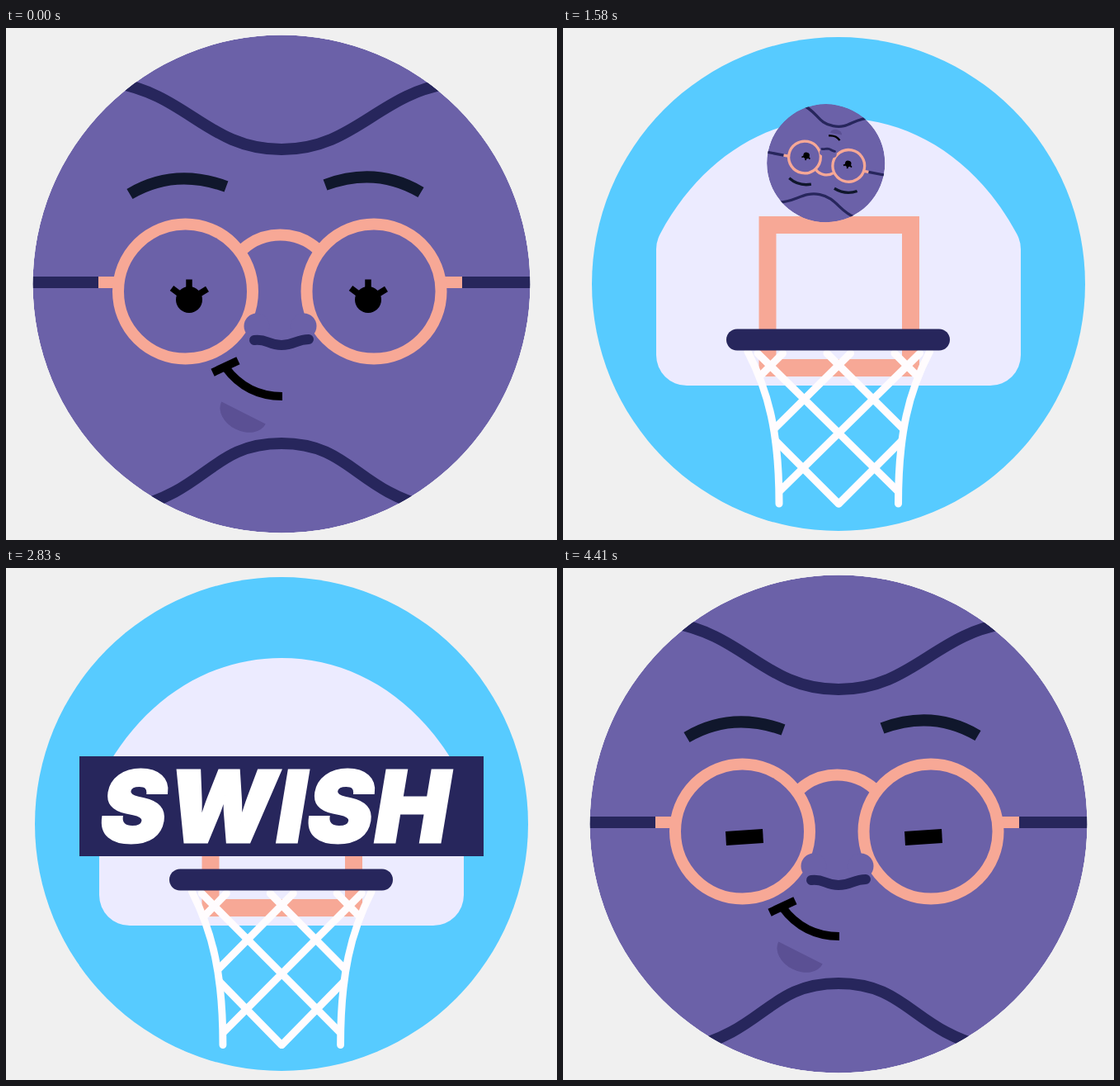
Recreate the animation shown at these times as an HTML page. Size 668 by 620 pixels, loop 4.5 s.

```html
<!DOCTYPE html>
<html lang="en">
<head>
<meta charset="utf-8">
<title>Swish</title>
<style>
  html, body { margin: 0; width: 100%; height: 100%; overflow: hidden; background: #f0f0f0; }
  svg { display: block; width: 668px; height: 620px; }
  .line { fill: none; stroke: #27265c; stroke-width: 14; }
  .frame { fill: none; stroke: #f7a896; stroke-width: 14; }
  .skin { fill: #6b61a8; }
  .navy { fill: #27265c; }
  .net { fill: none; stroke: #fffcfe; stroke-width: 9; stroke-linecap: round; stroke-linejoin: round; }
  .label {
    font: italic 900 120px Inter, "Liberation Sans", sans-serif; letter-spacing: 2px;
    fill: #fff; stroke: #fff; stroke-width: 3; stroke-miterlimit: 2; text-anchor: middle;
  }
</style>
</head>
<body>
<svg viewBox="0 0 668 620">
  <defs>
    <clipPath id="sky"><circle cx="334" cy="310" r="299"/></clipPath>
    <clipPath id="head"><circle cx="334" cy="310" r="301.5"/></clipPath>
    <clipPath id="wipe"><rect id="wipeRect" y="228" height="121"/></clipPath>
    <g id="eye">
      <circle cx="222" cy="329" r="16"/>
      <path d="M222 320V304.5M213 324L201 315M231 324L244 316" stroke="#000" stroke-width="7.5"/>
    </g>
    <path id="lid" d="M197 319L242 316L243 333L198 336Z"/>
    <g id="netHalf">
      <path d="M224 392C249 440 262 490 262 576"/>
      <path d="M236 394L405 560M320 394L412 485M258 500L334 576M402 394L428 420"/>
    </g>
  </defs>

  <circle cx="334" cy="310" r="299" fill="#57cbff"/>
  <path fill="#ecebff" d="M113 396V268Q113 258 118 249C167 158 247 109 334 109S501 158 550 249Q555 258 555 268V396A37 37 0 0 1 518 433H150A37 37 0 0 1 113 396Z"/>
  <rect x="248" y="238.500" width="173.500" height="173" fill="none" stroke="#f7a896" stroke-width="21"/>

  <g clip-path="url(#sky)"><use id="ball" href="#face"/></g>

  <g id="net" class="net">
    <use href="#netHalf"/>
    <use href="#netHalf" transform="matrix(-1 0 0 1 668.500 0)"/>
  </g>
  <rect class="navy" x="198" y="364.500" width="271" height="26" rx="13"/>

  <g clip-path="url(#wipe)">
    <rect class="navy" x="50" y="228" width="580" height="121"/>
    <text id="label" class="label" x="327" y="332">SWISH</text>
  </g>

  <g clip-path="url(#head)">
    <g id="bigHead">
      <g id="face" clip-path="url(#head)">
        <circle class="skin" cx="334" cy="310" r="301.500"/>
        <path id="hair" class="line" d="M130 66C220 80 245 147 334 147S450 80 540 66"/>
        <path id="chin" class="line" d="M150 582C245 560 250 503 334 503S423 560 518 582"/>
        <g id="brows" fill="none" stroke="#10172c" stroke-width="14">
          <path d="M150 201Q204 169 267 192"/>
          <path d="M387 190Q449 167 503 199"/>
        </g>
        <g id="glasses">
          <path class="line" d="M20 308H112M553 308H650"/>
          <path class="frame" d="M112 308H134M530 308H553M287 268A68 68 0 0 1 378 268"/>
          <circle class="frame" cx="217.500" cy="319" r="81.500"/>
          <circle class="frame" cx="446" cy="319" r="81.500"/>
        </g>
        <g id="eyes">
          <g id="open"><use href="#eye"/><use href="#eye" x="217"/></g>
          <g id="shut"><use href="#lid"/><use href="#lid" x="217"/></g>
        </g>
        <g id="nose">
          <circle class="skin" cx="304" cy="361" r="15.500"/>
          <circle class="skin" cx="361" cy="361" r="15.500"/>
          <path class="line" style="stroke-width:12;stroke-linecap:round" d="M301 378C316 376 318 384 334 384S352 377 367 377"/>
        </g>
        <g id="lips">
          <path id="shade" fill="#5b5094" d="M-30 0H30A30 22 0 0 1-30 0Z"/>
          <path id="mouth" fill="none" stroke="#000" stroke-width="10"/>
          <path id="dimple" stroke="#000" stroke-width="10" d="M-17 0H17"/>
        </g>
      </g>
    </g>
  </g>
</svg>
<script>
const FPS = 12, LOOP = 4500, FRAMES = 54;
const $ = Object.fromEntries([...document.querySelectorAll('[id]')].map(n => [n.id, n]));
const set = (node, name, value) => node.setAttribute(name, value);
const move = (node, x, y) => set(node, 'transform', `translate(${x} ${y})`);
const show = (node, on) => set(node, 'visibility', on ? 'visible' : 'hidden');
const ramp = (t, a, b) => Math.min(1, Math.max(0, (t - a) / (b - a)));
const smooth = (t, a, b) => { const p = ramp(t, a, b); return p * p * (3 - 2 * p); };
const mix = (a, b, p) => a + (b - a) * p;

function drawFace(t) {
  const returning = t > 3600;
  const lift = returning
    ? 640 * (1 - ramp(t, 3700, 4350)) ** 3
    : -557 * (Math.max(0, t - 700) / 300) ** 2;
  const lag = returning ? Math.min(1, lift / 44) : 0;
  const blink = t > 4340;
  show($.bigHead, Math.abs(lift) < 620);
  move($.bigHead, 0, lift);
  move($.hair, 0, -2 * lag);
  move($.chin, 0, -9 * lag);
  move($.brows, 0, returning ? 14 * (1 - ramp(t, 4080, 4550)) : 0);
  move($.glasses, 2 * lag, -5.5 * lag);
  move($.eyes, 0, -26 * lag);
  move($.nose, 0, -8 * lag);
  move($.lips, 0, -7 * lag);
  set($.open, 'display', blink ? 'none' : 'inline');
  set($.shut, 'display', blink ? 'inline' : 'none');

  // 0 is the sideways smirk, 1 the small centred smile
  const calm = smooth(t, 500, 750) * (1 - smooth(t, 4090, 4330));
  const at = (a, b) => mix(a, b, calm);
  const x = at(266, 287), y = at(411, 437);
  set($.mouth, 'd', `M${x} ${y}Q${at(292, 310)} ${at(446, 461)} ${at(335, 347)} ${at(446, 450)}`);
  set($.dimple, 'transform', `translate(${x} ${y - 1}) rotate(-25) scale(${1 - calm})`);
  set($.shade, 'transform', `translate(${at(288, 312)} ${at(466, 467)}) rotate(${at(27, 0)})`);
}

function drawBall(t) {
  const p = Math.min(1, (t - 1000) / 750);
  const x = mix(332, 63, (1 - p) ** 2);
  const y = 95 + 0.00055 * (t - 1230) ** 2;
  const turn = -66 + 476 * (t - 1000) / 1080;
  show($.ball, t > 900 && t < 2400);
  set($.ball, 'transform', `translate(${x} ${y}) rotate(${turn}) scale(.2375) translate(-334 -310)`);
}

function drawNet(t) {
  const pull = smooth(t, 1920, 2080) * (1 - smooth(t, 2110, 2300));
  const s = Math.max(0, t - 2300);
  const wobble = 0.025 * Math.exp(-s / 500) * Math.sin(s / 68) * (1 - ramp(t, 3000, 3400));
  const squeeze = 1 - 1.5 * wobble;
  const stretch = 1 + 0.047 * pull + wobble;
  set($.net, 'transform',
    `translate(334 392) skewX(${-0.5 * pull}) scale(${squeeze} ${stretch}) translate(-334 -392)`);
}

function drawBanner(t) {
  const enter = (1 - ramp(t, 2420, 2760)) ** 2;
  const leave = ramp(t, 3250, 3620) ** 2;
  const left = 89 - 24 * enter + 525 * leave;
  const right = 579 - 525 * enter + 24 * leave;
  set($.wipeRect, 'x', left);
  set($.wipeRect, 'width', Math.max(0, right - left));
  move($.label, 85 * (leave - enter), 0);
}

function draw(ms) {
  const step = Math.min(FRAMES - 1, Math.floor((ms % LOOP + 6.7) * FPS / 1000));
  const t = step * 1000 / FPS;
  drawFace(t);
  drawBall(t);
  drawNet(t);
  drawBanner(t);
}

const start = performance.now();
function tick() {
  draw(performance.now() - start);
  requestAnimationFrame(tick);
}
tick();
</script>
</body>
</html>
```
